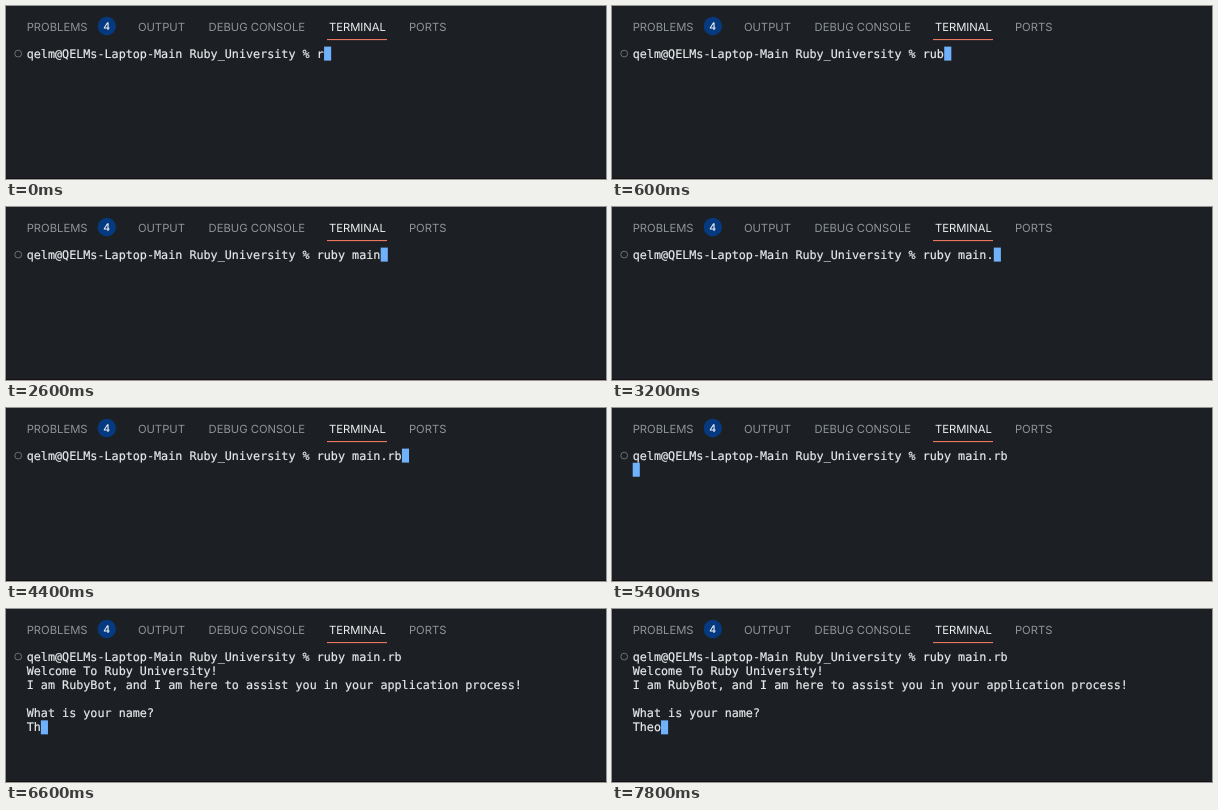
An HTML page for the animation above (8 s loop, 600 px wide and 173 px high).

```html
<!DOCTYPE html>
<html lang="en">
<head>
<meta charset="utf-8">
<title>Terminal session</title>
<style>
  html, body { margin: 0; width: 100%; height: 100%; overflow: hidden; background: #1c2024; }
  svg { display: block; width: 100%; height: 100%; }
  text { white-space: pre; text-rendering: geometricPrecision; }
  .tab { font: 11.25px Inter, sans-serif; fill: #8f9499; }
  .active { fill: #eef0f2; }
  .badge { font: 500 10.5px Inter, sans-serif; fill: #f0f4fa; text-anchor: middle; }
  .line { font: 11.76px "DejaVu Sans Mono", monospace; fill: #e8eaec; stroke: #e8eaec; stroke-width: .2px; }
</style>
</head>
<body>
<svg id="stage" viewBox="0 0 600 173">
  <rect width="600" height="173" fill="#1c2024"/>
  <rect y="172" width="600" height="1" fill="#150f12"/>
  <circle cx="100.8" cy="20" r="9.2" fill="#063a80"/>
  <text class="badge" x="100.8" y="23.8">4</text>
  <rect x="321" y="33" width="60" height="1.1" fill="#ec775f"/>
  <circle cx="12.2" cy="47.6" r="3.4" fill="none" stroke="#6b7075"/>
  <rect id="cursor" width="7.1" height="14" fill="#6fb1fb"/>
</svg>
<script>
const LOOP = 8000;
const LEFT = 20.7, BASE = 51.6, CHAR = 7.08, ROW = 14.15;
const PROMPT = "qelm@QELMs-Laptop-Main Ruby_University % ";
const COMMAND = "ruby main.rb";
const NAME = "Theo";
const REPLY = [
  "Welcome To Ruby University!",
  "I am RubyBot, and I am here to assist you in your application process!",
  "",
  "What is your name?"
];
const TABS = [["PROBLEMS", 20.7], ["OUTPUT", 131.9], ["DEBUG CONSOLE", 202.6],
  ["TERMINAL", 322.9], ["PORTS", 402.9]];

// Times at which each character appears, in ms
const COMMAND_KEYS = [0, 200, 600, 1000, 1600, 2000, 2200, 2400, 2600, 3000, 3800, 4400];
const NAME_KEYS = [6400, 6600, 7000, 7400];
const ENTER = 5400, OUTPUT = 5600;

const stage = document.getElementById("stage");
const cursor = document.getElementById("cursor");

function addText(cls, x, y, value = "") {
  const el = document.createElementNS(stage.namespaceURI, "text");
  el.setAttribute("class", cls);
  el.setAttribute("x", x);
  el.setAttribute("y", y);
  el.textContent = value;
  stage.appendChild(el);
  return el;
}

for (const [label, x] of TABS) {
  addText(label === "TERMINAL" ? "tab active" : "tab", x, 24.8, label);
}
const rows = Array.from({ length: 6 }, (_, i) => addText("line", LEFT, BASE + i * ROW));

const typed = (text, keys, t) => text.slice(0, keys.filter(k => k <= t).length);

function render(t) {
  const lines = [PROMPT + typed(COMMAND, COMMAND_KEYS, t)];
  if (t >= OUTPUT) lines.push(...REPLY);
  if (t >= ENTER) lines.push(typed(NAME, NAME_KEYS, t));
  rows.forEach((row, i) => {
    const value = lines[i] || "";
    if (row.textContent !== value) row.textContent = value;
  });
  const last = lines.length - 1;
  cursor.setAttribute("x", LEFT + lines[last].length * CHAR);
  cursor.setAttribute("y", BASE - 11 + last * ROW);
}

const start = performance.now();
function tick() {
  render((performance.now() - start) % LOOP);
  requestAnimationFrame(tick);
}
tick();
</script>
</body>
</html>
```
